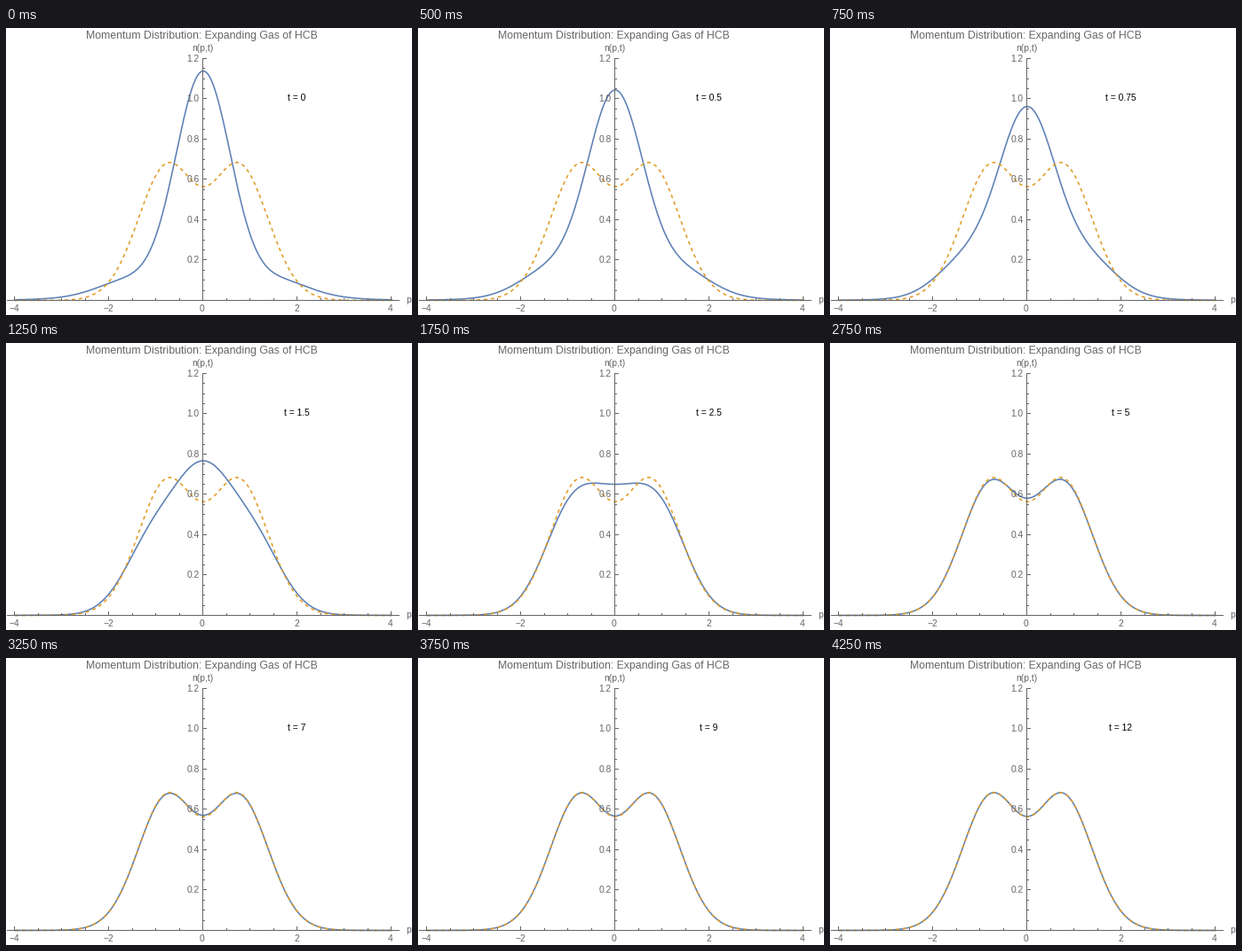
Recreate the animation shown at these times as a matplotlib script. Size 457 by 324 pixels, loop 4500 ms.

```python
import math

import numpy as np
import matplotlib.pyplot as plt
from matplotlib.animation import FuncAnimation

plt.rcParams["font.family"] = "Liberation Sans"

W, H, DPI = 457, 324, 64
PT = 72 / DPI                      # points per pixel
X0, Y0, SX, SY = 222, 307.5, 53, 227.5
GRAY, BLUE, ORANGE = "#666666", "#5E81B5", "#E19C24"
TIMES = [0, 0.25, 0.5, 0.75, 1, 1.5, 2, 2.5, 3, 3.5, 4, 5, 6, 7, 8, 9, 10, 12]

# Two hard-core bosons released from a harmonic trap
x = np.linspace(-6, 6, 1201)
z = x[::10]
psi = np.abs(x[:, None] - z) * np.exp(-(x[:, None]**2 + z**2) / 2) / np.sqrt(np.pi)
half = np.linspace(0, 4, 201)
p = np.concatenate([-half[:0:-1], half])


def boson_density(t):
    b = np.sqrt(1 + t * t)
    kernel = np.exp(1j * (t * x**2 / 2 - b * half[:, None] * x))
    amplitude = kernel @ psi * (x[1] - x[0])
    n = b / np.pi * (np.abs(amplitude)**2).sum(axis=1) * (z[1] - z[0])
    return np.concatenate([n[:0:-1], n])


def fermion_density(k):
    return np.exp(-k**2) * (1 + 2 * k**2) / np.sqrt(np.pi)


def px(k):
    return X0 + SX * k


def py(n):
    return Y0 - SY * n


def crisp(v):
    """Centre of the pixel that a thin line at v falls on."""
    return math.ceil(v - 1e-6) - 0.5


fig = plt.figure(figsize=(W / DPI, H / DPI), dpi=DPI, facecolor="white")
ax = fig.add_axes([0, 0, 1, 1])
ax.set(xlim=(0, W), ylim=(H, 0))
ax.axis("off")


def rule(xs, ys):
    ax.plot(xs, ys, color=GRAY, lw=PT, zorder=4, solid_capstyle="butt", snap=False)


def label(u, v, s, size=10.3, ha="center", color=GRAY):
    return ax.text(u, v, s, fontsize=size * PT, ha=ha, va="baseline",
                   color=color, zorder=5)


axis_x, axis_y = crisp(X0), crisp(Y0)
rule([1, 443], [axis_y, axis_y])
rule([axis_x, axis_x], [34, 308])
for i in range(-8, 9):
    major = i % 4 == 0
    u = crisp(px(i / 2))
    rule([u, u], [axis_y, axis_y - (4.5 if major else 2.5)])
    if major:
        label(u - 0.5, 319.5, str(i // 2).replace("-", "\u2212"))
for i in range(1, 25):
    major = i % 4 == 0
    v = crisp(py(i / 20))
    rule([axis_x, axis_x + (4.5 if major else 2.5)], [v, v])
    if major:
        label(217.8, v + 3.5, f"{i / 20:.1f}", ha="right")

label(220.5, 12, "Momentum Distribution: Expanding Gas of HCB", 12.3)
label(221, 25.5, "n(p,t)")
label(453, 310.5, "p")

curves = [py(boson_density(t)) for t in TIMES]
solid, = ax.plot(px(p), curves[0], color=BLUE, lw=1.6 * PT, zorder=2)
ax.plot(px(p), py(fermion_density(p)), color=ORANGE, lw=1.6 * PT, zorder=3,
        ls=(0, (2.5, 2.5)), dash_capstyle="butt")
clock = label(px(2) - 1, 82.5, "", color="black")


def update(i):
    solid.set_ydata(curves[i])
    clock.set_text(f"t = {TIMES[i]:g}")
    return solid, clock


anim = FuncAnimation(fig, update, frames=len(TIMES), interval=250, repeat=True,
                     repeat_delay=0)
plt.show()
```
